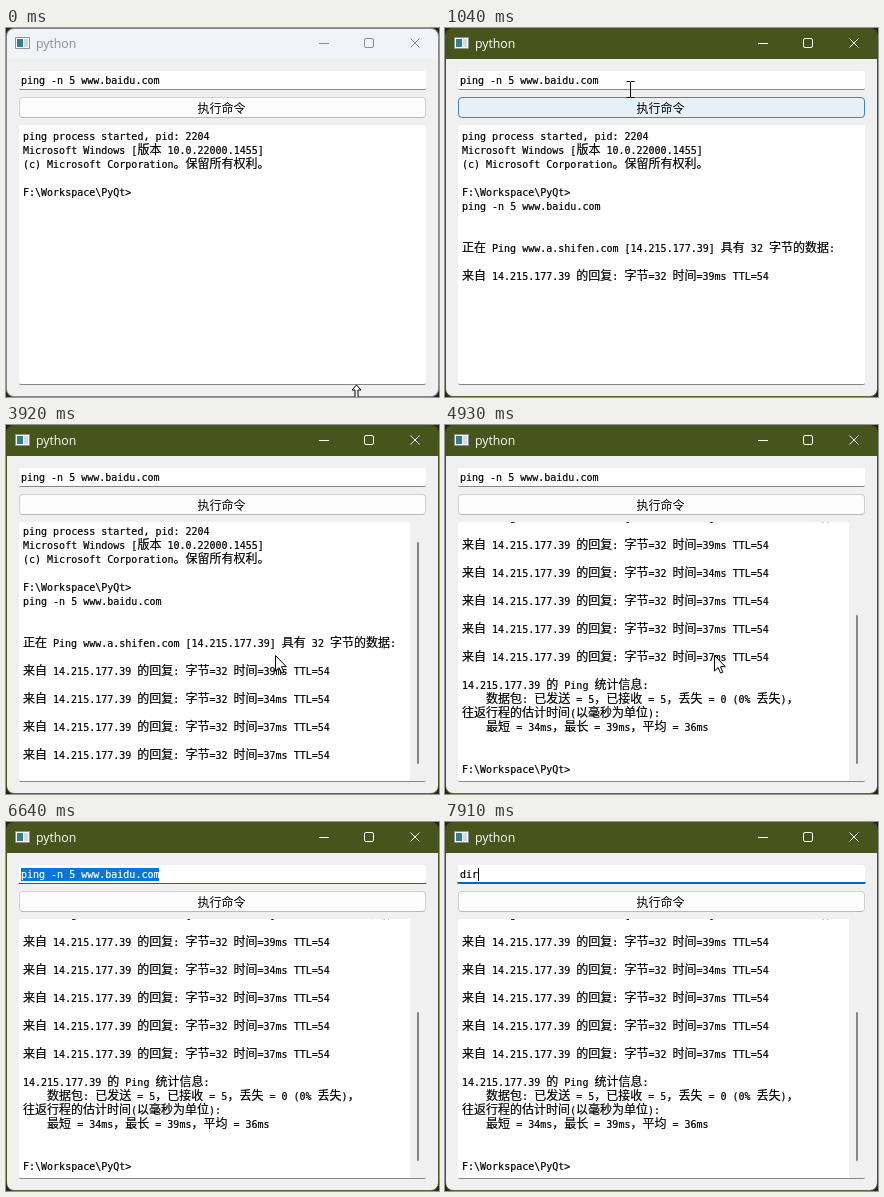
An HTML page for the animation above (8000 ms loop, 433 px wide and 369 px high).

```html
<!DOCTYPE html>
<html lang="zh-CN">
<head>
<meta charset="utf-8">
<title>python</title>
<style>
html, body { margin: 0; width: 100%; height: 100%; overflow: hidden; background: #22241c; }
#stage { position: relative; width: 433px; height: 369px; overflow: hidden; color: #000; }
#stage div, #stage svg { position: absolute; box-sizing: border-box; }
.anim { animation: 8s step-end infinite; }

.frame { inset: 0; border: 1px solid #47541b; border-bottom-color: #5d6739; border-radius: 8px; background: linear-gradient(#47541b 30px, #f0f0f0 30px); color: #fff; }
.frame.idle { border-color: #85878a; background: linear-gradient(#f0f4f9 30px, #f0f0f0 30px); color: #8b8d90; animation-name: idle; }
.name { left: 29px; top: 5px; font: 12.3px/20px "Open Sans", "Noto Sans", sans-serif; }
.frame svg { left: -1px; top: -1px; fill: none; stroke: currentColor; }

.mono { font: 10px/14px "DejaVu Sans Mono", "Liberation Mono", monospace; white-space: pre; -webkit-text-stroke: .2px; }
b { font: 12px/0 "Noto Sans CJK SC", "Noto Sans CJK", sans-serif; }

.edit { left: 13px; top: 43px; width: 407px; height: 19px; background: #fff; border-bottom: 1px solid #868686; border-radius: 2px; }
.edit .mono { left: 2px; top: 3px; }
.cmd { animation-name: cmd; }
.sel { height: 13px; background: #0078d7; color: #fff; animation-name: sel; }
.typed { height: 13px; overflow: hidden; box-sizing: content-box !important; border-right: 1px solid #000; animation-name: type, blink; }
.focus { left: 12px; top: 60px; width: 409px; height: 2px; border-radius: 0 0 2px 2px; background: #0067c0; animation: focus 8s linear infinite; }

.btn { left: 13px; top: 69px; width: 407px; height: 21px; border: 1px solid #d0d0d0; border-bottom-color: #b9b9b9; border-radius: 4px; background: #fdfdfd; }
.btn.hot { border-color: #3c88c4; background: #e5f0f8; animation: hot 8s linear infinite; }
.label { left: 12px; top: 69px; width: 407px; line-height: 21px; text-align: center; }
.label b { line-height: 21px; }

.view { left: 13px; top: 97px; width: 407px; height: 260px; background: #fff; border-bottom: 1px solid #868686; border-radius: 2px; overflow: hidden; }
.doc { left: 4px; overflow: hidden; animation-name: print; }
.bar { right: 0; top: 0; width: 16px; height: 259px; background: #f0f0f0; animation-name: bar; }
.thumb { left: 7px; bottom: 17px; width: 2px; border-radius: 1px; background: #868686; animation-name: thumb; }

.cursor { left: 0; top: 0; overflow: visible; fill: #fff; stroke: #000; animation-name: move; }
.resize { animation-name: resize; }
.arrow { animation-name: arrow; }
.beam { fill: none; animation-name: beam; }

/* 1% = 80 ms */
@keyframes idle { 0% { visibility: visible } 9.2%, to { visibility: hidden } }
@keyframes print {
  0% { height: 70px; top: 5px }
  10.125% { height: 84px }
  11.25% { height: 154px }
  23.7% { height: 182px }
  36.25% { height: 210px; top: 5px }
  49% { height: 238px; top: 3px }
  61.625%, to { height: 378px; top: -123px }
}
@keyframes bar { 0% { visibility: hidden } 49%, to { visibility: visible } }
@keyframes thumb { 0%, 49% { height: 222px } 61.625%, to { height: 149px } }
@keyframes hot {
  0%, 7.375% { opacity: 0 }
  9.25%, 13% { opacity: 1 }
  16%, 22.75% { opacity: 0 }
  23.7% { opacity: .3 }
  25.5%, 71.375% { opacity: 0 }
  72.375% { opacity: .5 }
  74.4%, to { opacity: 0 }
}
@keyframes cmd { 0% { visibility: visible } 80.125%, to { visibility: hidden } }
@keyframes sel { 0% { visibility: hidden } 80.125% { visibility: visible } 87%, to { visibility: hidden } }
@keyframes type { 0% { width: 0; visibility: hidden } 87% { width: 12px; visibility: visible } 88%, to { width: 18px; visibility: visible } }
@keyframes blink { 0% { border-color: #000 } 95.75% { border-color: transparent } 98.875%, to { border-color: #000 } }
@keyframes focus {
  0%, 80.125% { opacity: 0; clip-path: inset(1px 0 0) }
  83%, 86.99% { opacity: 1; clip-path: inset(1px 0 0) }
  87%, to { opacity: 1; clip-path: inset(0) }
}
@keyframes move {
  0% { transform: translate(350px, 367px); animation-timing-function: steps(8) }
  7.375% { transform: translate(192px, 82px) }
  11.25% { transform: translate(190px, 78px) }
  13% { transform: translate(185px, 61px) }
  16% { transform: translate(185px, 58px) }
  22.75% { transform: translate(195px, 80px); animation-timing-function: steps(4) }
  26.5% { transform: translate(284px, 232px) }
  38.375% { transform: translate(262px, 226px) }
  41.125% { transform: translate(266px, 228px) }
  42.125% { transform: translate(269px, 230px) }
  66.375% { transform: translate(269px, 230px); animation-timing-function: steps(6) }
  72.375% { transform: translate(181px, 59px); animation-timing-function: steps(5) }
  77.25% { transform: translate(-5px, 20px) }
  78.25%, to { transform: translate(-40px, 20px) }
}
@keyframes resize { 0% { visibility: visible } .92%, to { visibility: hidden } }
@keyframes arrow {
  0% { visibility: hidden }
  .92% { visibility: visible }
  13% { visibility: hidden }
  22.75% { visibility: visible }
  72.375% { visibility: hidden }
  75.3%, to { visibility: visible }
}
@keyframes beam {
  0% { visibility: hidden }
  13% { visibility: visible }
  22.75% { visibility: hidden }
  72.375% { visibility: visible }
  75.3%, to { visibility: hidden }
}
</style>
</head>
<body>
<div id="stage">
  <div class="frame">
    <div class="name">python</div>
    <svg width="433" height="31"><path id="ctl" d="M313 15.5h10M404.5 10.5l9 9m0-9-9 9M360 10.5h6q1.500 0 1.500 1.500v6q0 1.500-1.500 1.500h-6q-1.500 0-1.500-1.500v-6q0-1.500 1.500-1.500z"/></svg>
  </div>
  <div class="frame idle anim">
    <div class="name">python</div>
    <svg width="433" height="31"><use href="#ctl"/></svg>
  </div>
  <svg width="30" height="30">
    <path d="M9.500 9.500h14v11h-14z" fill="#f7f8f8" stroke="#8c9298"/>
    <path d="M11 11h6v8h-6z" fill="#2f7f8c"/>
    <path d="M18 11h4v8h-4z" fill="#d5dade"/>
  </svg>

  <div class="edit">
    <div class="mono cmd anim">ping -n 5 www.baidu.com</div>
    <div class="mono sel anim">ping -n 5 www.baidu.com</div>
    <div class="mono typed anim">dir</div>
  </div>
  <div class="focus"></div>

  <div class="btn"></div>
  <div class="btn hot"></div>
  <div class="label"><b>执行命令</b></div>

  <div class="view">
    <div class="mono doc anim"></div>
    <div class="bar anim"><div class="thumb anim"></div></div>
  </div>

  <svg class="cursor anim" width="1" height="1">
    <path class="resize anim" d="M.5-10 5-5H2V5h3L.5 10-4 5h3V-5h-3z"/>
    <path class="arrow anim" d="M.5.5v15.500l3.600-3.400 2.500 5.500 2.300-1-2.400-5.400h4.800z"/>
    <path class="beam anim" d="M-3.500-7.500H0L.5-7l.5-.5h3.500M.5-7V8M-3.500 8.500H0L.5 8l.5.500h3.500"/>
  </svg>
</div>
<script>
const prompt = 'F:\\Workspace\\PyQt>';
const replies = [39, 34, 37, 37, 37].map(ms => `来自 14.215.177.39 的回复: 字节=32 时间=${ms}ms TTL=54\n`);
const lines = [
  'ping process started, pid: 2204',
  'Microsoft Windows [版本 10.0.22000.1455]',
  '(c) Microsoft Corporation。保留所有权利。',
  '',
  prompt,
  'ping -n 5 www.baidu.com',
  '\n',
  '正在 Ping www.a.shifen.com [14.215.177.39] 具有 32 字节的数据:\n',
  ...replies,
  '14.215.177.39 的 Ping 统计信息:',
  '    数据包: 已发送 = 5，已接收 = 5，丢失 = 0 (0% 丢失)，',
  '往返行程的估计时间(以毫秒为单位):',
  '    最短 = 34ms，最长 = 39ms，平均 = 36ms',
  '\n',
  prompt
];
// Full-width characters take two Latin columns
document.querySelector('.doc').innerHTML =
  lines.join('\n').replace(/>/g, '&gt;').replace(/[^\x00-\x7f]+/g, '<b>$&</b>');
</script>
</body>
</html>
```
